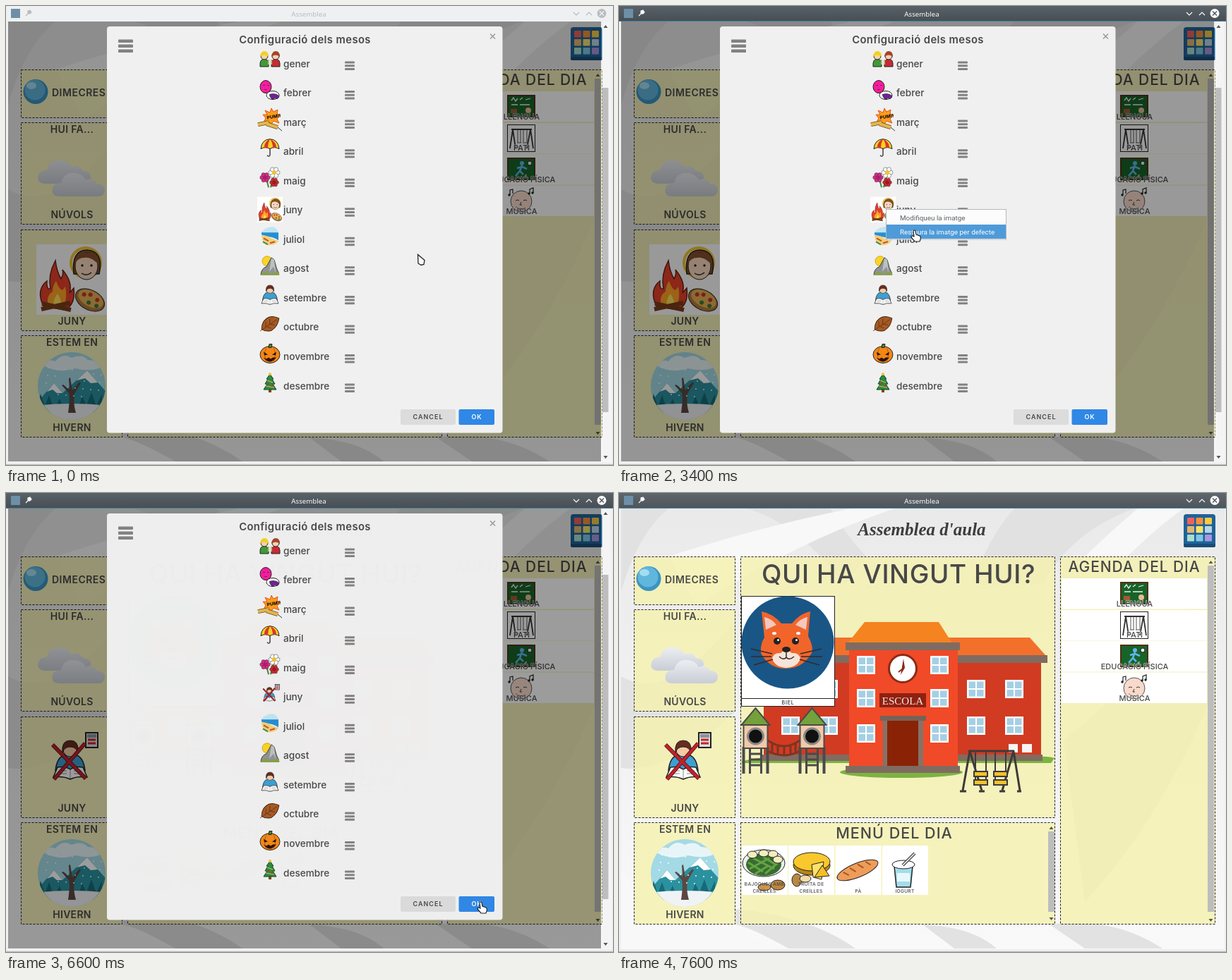
Animation, 860 px wide and 651 px high, one loop 7700 ms. Source, as an HTML page:

```html
<!DOCTYPE html>
<html lang="ca">
<head>
<meta charset="utf-8">
<title>Assemblea</title>
<style>
html, body { margin: 0; width: 100%; height: 100%; overflow: hidden; background: #f0f0f0; }
svg { display: block; font: 600 14px Inter, sans-serif; }
.ui { font: 9.9px Roboto, sans-serif; }
</style>
</head>
<body>
<svg id="stage" width="860" height="651" viewBox="0 0 860 651"></svg>
<script>
const $ = id => document.getElementById(id);
const R = (x, y, w, h, fill, more = '') => `<rect x="${x}" y="${y}" width="${w}" height="${h}" fill="${fill}" ${more}/>`;
const E = (x, y, rx, ry, fill, more = '') => `<ellipse cx="${x}" cy="${y}" rx="${rx}" ry="${ry}" fill="${fill}" ${more}/>`;
const C = (x, y, r, fill, more) => E(x, y, r, r, fill, more);
const P = (d, fill, stroke = 'none', w = 1) => `<path d="${d}" fill="${fill}" stroke="${stroke}" stroke-width="${w}"/>`;
const L = (d, stroke, w = 1) => P(d, 'none', stroke, w);
const T = (x, y, size, text, more = '') => `<text x="${x}" y="${y}" font-size="${size}" fill="#484848" ${more}>${text}</text>`;
const M = (x, y, size, text, more = '') => T(x, y, size, text, `text-anchor="middle" ${more}`);
const G = (x, y, body, s = 1) => `<g transform="translate(${x} ${y}) scale(${s})">${body}</g>`;
const each = (list, f) => list.map(f).join('');
const INK = 'stroke="#222"';

// ---- pictograms, drawn around their own centre ----
const student =
  P('M-23 6Q-21 -14 -9 -17H5Q17 -14 19 6L10 10H-14Z', '#3c9fd2', '#222', 1.5) +
  C(-2, -24, 10, '#f5c9a5', INK) + P('M-13 -19Q-15 -37 -2 -37Q11 -37 9 -19Q7 -28 -2 -28Q-11 -28 -13 -19', '#6a2a20', '#222') +
  P('M-26 15L-20 1Q-9 -1 -2 4Q5 -1 16 1L22 15Q8 13 -2 18Q-12 13 -26 15Z', '#fff', '#222', 1.5) +
  L('M-2 4V17M-18 6H-7M-20 10H-7M3 6H14M3 10H16', '#888');
const cross = 'M-27 -31L20 17M19 -33L-25 18';
const noSchool = student +
  R(20, -48, 17, 21, '#ddd', 'stroke="#222" stroke-width="2"') + R(22, -46, 13, 5, '#8a9499') + L('M23 -38H34M23 -33H34', '#c4262c', 3) +
  L(cross, '#3a1214', 5.5) + L(cross, '#c4202a', 4);
const bonfire = R(-50, -50, 100, 100, '#fff') +
  P('M-40 38Q-51 14 -35 2Q-36 15 -30 13Q-34 -7 -23 -27Q-21 -11 -15 -1Q-11 -8 -13 -14Q2 4 -3 19L3 12Q6 36 -10 43Z', '#e8402a', '#64241a', 1.5) +
  P('M-33 38Q-37 23 -27 17Q-27 9 -22 2Q-18 14 -13 15L-9 10Q-5 30 -14 40Z', '#ffa428') +
  P('M-25 39Q-27 28 -20 20Q-14 29 -14 39Z', '#ffe15a') +
  L('M-43 42L-2 33M-42 34L-1 43', '#7a3e1b', 6) +
  C(20, -24, 21, 'none', 'stroke="#f4c430" stroke-width="4"') +
  P('M3 -8Q-1 -42 22 -42Q46 -40 39 -8Z', '#85502c', '#222', 1.5) +
  E(21, -19, 16, 19, '#f8d8bd', INK) + P('M4 -22Q8 -42 22 -38Q37 -38 38 -21Q28 -33 18 -31Q9 -31 4 -22', '#85502c') +
  C(15, -20, 1.7, '#222') + C(28, -20, 1.7, '#222') + L('M14 -9Q21 -4 28 -10', '#222', 1.5) +
  G(26, 29, '<g transform="rotate(28)">' + E(0, 0, 22, 14, '#b57a37', INK) + E(0, -2, 19, 11, '#e4b255') +
    each([[-11, -3], [0, 4], [9, -5], [12, 3], [-3, -7]], (p, i) => C(...p, 3, i % 2 ? '#3d7a3b' : '#cc3528')) + '</g>');

const petals = (x, y, r, fill, mid) => each([0, 1, 2, 3, 4, 5], k =>
  C((x + r * Math.cos(k * 1.047)).toFixed(1), (y + r * Math.sin(k * 1.047)).toFixed(1), r * .6, fill, 'stroke="#333" stroke-width=".5"')) + C(x, y, r * .6, mid);
const person = (x, hair, coat) => P(`M${x - 6} 9Q${x - 7} -2 ${x} -2Q${x + 7} -2 ${x + 6} 9Z`, coat, '#222') +
  C(x, -6, 5, '#f7d0b0', INK) + P(`M${x - 6} -5Q${x - 5} -13 ${x} -13Q${x + 6} -13 ${x + 6} -5Q${x} -10 ${x - 6} -5`, hair);

const months = {
  gener: person(-8, '#f2d21e', '#3f9b36') + person(8, '#a4442c', '#c72a32') + L('M-2 -1V6M2 -1V6', '#bb8', 2),
  febrer: E(-6, -4, 8, 9, '#f41d9c', INK) + L('M-10 -6H-7M-4 -6H-1M-8 0H-4', '#8c1560') +
    E(4, 8, 9, 6, '#fff', INK) + P('M-1 7Q7 4 13 9Q12 15 7 12Q2 17 -1 7', '#6f2292', '#222', .6),
  'març': P('M2 -15L5 -10L11 -13L10 -7L15 -5L10 0L13 6L5 3L1 9L-2 3L-9 5L-6 -1L-10 -6L-4 -6L-7 -12L0 -9Z', '#ff9d19', '#e54f1a') +
    '<text x="-4" y="0" font-size="6.5" font-weight="800" transform="rotate(-10)" fill="#111">PUM!!</text>' +
    L('M-17 8L-2 5M-5 7L11 12', '#6a4a20', 6) + L('M-17 8L-2 5M-5 7L11 12', '#e4b64d', 4.5) + L('M11 12L17 17', '#333'),
  abril: P('M-13 1Q-12 -12 0 -13Q12 -12 13 1Q6 -3 0 1Q-6 -3 -13 1', '#f5d326', '#222') +
    P('M-8 -1Q-8 -10 0 -13Q-3 -7 -3 -1L0 1ZM4 -1Q4 -8 0 -13Q9 -9 9 -1Z', '#dd3524') + L('M0 0V10Q-1 13 -4 10', '#333', 1.4),
  maig: L('M-5 2L-2 14M6 -4L1 14', '#3d8b36', 2) + petals(6, -7, 5, '#fff', '#f5c32b') + petals(-7, 0, 4.5, '#d52b86', '#b41a6b') + petals(6, 7, 4, '#d5252a', '#a01820'),
  juny: `<g id="rowOld">${G(0, 4, bonfire, .36)}</g><g id="rowNew">${G(0, 4, noSchool, .36)}</g>`,
  juliol: P('M-12 -6Q-5 -14 5 -13Q13 -9 12 0H-12Z', '#bfe5f4') + P('M-12 -5H12V6Q4 1 -3 1L-12 -2Z', '#268fd0') +
    P('M-12 -1Q-2 -1 1 3L12 7Q8 13 -2 13Q-11 11 -12 -1', '#eed178') + L('M-9 3L-2 7M0 10L7 8', '#cf4d2d', 2) + L('M-10 8L-3 12', '#389047', 2),
  agost: C(-4, -6, 7, '#f8d527', 'stroke="#d9a41a"') + P('M-13 13Q-12 4 -5 2L2 -11L6 -8L9 3L13 13Z', '#8e9493', '#444') +
    P('M2 -10L-1 9L5 2L8 11L6 -8Z', '#bcc1bf') + P('M-14 14Q-6 6 0 12L13 9V14Z', '#879f45'),
  setembre: G(1, 5, student, .5),
  octubre: '<g transform="rotate(-32)">' + P('M-14 0Q-7 -11 4 -9Q11 -7 15 0Q8 9 -3 9Q-11 7 -14 0', '#a65a25', '#42210b') + L('M-17 1L12 0M-7 0L-3 -6M-1 0L4 -6M-6 0L-2 6M0 0L5 5', '#65310f', .8) + '</g>',
  novembre: E(0, 2, 14, 12, '#f28718', INK) + L('M-5 -8Q-10 2 -5 13M5 -8Q10 2 5 13', '#c35b0b') + P('M-2 -8L-1 -13H3L2 -8Z', '#4f8133', '#222') +
    P('M-9 -2L-3 2L-8 3ZM9 -2L3 2L8 3ZM-9 6L-5 8L-2 6L1 8L4 6L9 6Q4 12 0 12Q-5 12 -9 6', '#2b1408'),
  desembre: R(-2, 9, 4, 5, '#7a4823') + P('M0 -12L5 -5H3L7 2H4L9 10H-9L-4 2H-7L-3 -5H-5Z', '#2c8a45', '#154823') +
    L('M-4 -3L4 0M-6 5L6 7', '#e2c53b') + C(0, -12, 2, '#f4c52a') + C(-2, 2, 1.3, '#d8262c') + C(3, 5, 1.3, '#d8262c')
};
const rowY = i => 82 + 41.55 * i;
const bars = (x, y, w, h, step) => each([0, 1, 2], k => R(x, y + k * step, w, h, '#828282', 'rx="1"'));

// ---- page ----
const card = (x, y, w, h) => R(x, y, w, h, '#f6f2ae', 'fill-opacity=".8" stroke="#222" stroke-dasharray="3 2"');
const scroll = (x, top, bottom, y0, y1, w) => R(x, y0, w, y1 - y0, '#bdbdbd') +
  P(`M${x + 1.5} ${top + 3}l3 -4l3 4zM${x + 1.5} ${bottom - 3}l3 4l3 -4z`, '#555');
const pane = (x, y) => R(x, y, 26, 26, '#fff') + each([0, 1, 2, 3], k => R(x + 2.5 + (k % 2) * 11.5, y + 2.5 + (k >> 1) * 11.5, 9.5, 9.5, '#a5cfe4'));
const tower = x => L(`M${x - 17} 360V398M${x + 17} 360V398`, '#4a4a4a', 4) + L(`M${x - 8} 362V398M${x + 8} 362V398M${x - 8} 370h16m-16 8h16m-16 8h16`, '#4a4a4a', 3) +
  R(x - 17, 328, 34, 34, '#f1c9a8', 'stroke="#4a4a4a" stroke-width="2"') + C(x, 345, 11, '#111', 'stroke="#888" stroke-width="3"') +
  P(`M${x - 20} 329L${x} 305L${x + 20} 329Z`, '#74a13b', '#4a4a4a', 2);

const school =
  P('M174 381Q200 370 330 374H560Q605 372 617 376L612 383H174Z', '#7cb342') + E(400, 396, 87, 8, '#7cb342') +
  P('M222 205H582L606 232H198Z', '#f3702b') + R(205, 240, 393, 133, '#d13b22') + R(198, 230, 409, 11, '#806b60') + R(203, 371, 397, 9, '#806b60') +
  P('M324 213L348 183H453L472 213Z', '#f58320') + R(326, 220, 154, 170, '#f04a28') + R(321, 212, 162, 11, '#806b60') + R(321, 387, 162, 10, '#806b60') +
  each([231, 278, 328], y => pane(337, y) + pane(441, y)) +
  each([265, 317], y => each([230, 284, 493, 547], x => pane(x, y))) +
  R(374, 322, 57, 65, '#857267') + R(370, 316, 65, 7, '#766257') + R(380, 323, 44, 64, '#8a2306') +
  R(369, 284, 66, 20, '#8e2112') + '<text x="402" y="299.5" text-anchor="middle" style="font:15px Liberation Serif,serif" fill="#f6e9df">ESCOLA</text>' +
  C(402, 249, 19.5, '#fff', 'stroke="#8c2a16" stroke-width="3"') + P('M399 258L403 235L405 248Z', '#8c2a16') + L('M401 250L396 254', '#8c2a16', 2) +
  R(552, 356, 13, 12, '#f5f5f5') + R(571, 356, 14, 12, '#f5f5f5') +
  L('M211 351Q234 367 256 351M211 366Q234 378 256 366', '#7d3423', 3) + L('M217 355V367M225 359V371M234 360V372M243 359V371M250 355V367', '#7d3423', 3) +
  tower(193.5) + tower(273.5) +
  L('M495 366H560M497 366L487 422M497 366L514 422M559 366L543 422M559 366L568 422', '#3d3a3a', 3) +
  L('M483 423H492M510 423H518M539 423H547M564 423H570', '#3d3a3a', 3) +
  each([503, 531], x => L(`M${x + 2} 368V414M${x + 17} 368V414`, '#3d3a3a', 2) +
    each([395, 407], y => R(x, y, 19, 7, '#f2c22b', 'stroke="#3d3a3a" stroke-width="2"')));

const fox = R(173.5, 146.5, 132, 156, '#fff', 'stroke="#222"') + L('M173 291.5H306', '#222') + C(239, 212, 65.5, '#195686') +
  P('M206 205L202 168Q218 171 230 185H245Q256 171 271 168L268 203Q276 218 273 227Q260 249 237 249Q212 249 201 227Q200 214 206 205', '#f1652b') +
  P('M208 194L206 176Q216 178 223 187ZM265 194L267 176Q257 178 250 187Z', '#f7c7bd') +
  P('M217 235Q219 226 229 227L237 221L245 227Q255 226 257 235Q253 247 237 248Q221 247 217 235', '#f7e4d8') +
  each([[224, 210, 220], [250, 210, 254]], ([x, y, b]) => C(x, y, 5, '#222') + C(x + 1.5, y - 1.5, 1.5, '#fff') + E(b, 199, 3, 2, '#fff')) +
  E(237, 222, 6, 4, '#222') +
  L('M237 225V233M227 232Q233 238 237 233Q241 238 248 232M217 228L187 221M216 232L187 232M218 236L191 244M257 228L287 221M258 232L288 232M256 236L284 244', '#332b2b', 1.5) +
  M(239.5, 299.5, 7, 'BIEL', 'letter-spacing=".8"');

const cloud = (x, y) => G(x, y, P('M10 37Q-2 36 1 25Q4 17 13 18Q17 2 33 4Q44 5 48 14Q58 9 64 19Q76 20 75 29Q73 38 64 37Z', 'url(#mist)'));
const winter = '<clipPath id="disc"><circle cx="93" cy="539" r="48"/></clipPath><g clip-path="url(#disc)">' +
  R(44, 490, 98, 98, '#a3dae5') + P('M53 510Q59 500 70 504Q80 491 93 499Q108 493 116 502Q132 502 133 513Q120 519 98 514Q75 522 53 510', '#e8f5f8') +
  P('M40 567L68 535L80 549L115 517L146 552V572H40Z', '#2b919f') + P('M68 535L58 547L66 544L72 549L80 549ZM115 517L100 531L112 528L120 535L130 534Z', '#fff') +
  P('M44 572l5 -22l6 18l6 -16l7 20l8 -15l6 15l20 -1l6 -17l6 12l7 -18l7 19l8 -17v27h-100z', '#176a76') +
  P('M40 567Q93 561 146 567V590H40Z', '#f0f3f6') +
  P('M88 577Q91 556 89 549L79 538L81 537L90 544L89 528L91 527L94 545L104 533L106 535L97 550Q95 564 99 577Z', '#5b4743') +
  each([...Array(22).keys()], i => C(50 + i * 37 % 87, 512 + i * 29 % 48, .9, '#fff')) + '</g>';

const plate = E(205, 525, 30, 19, '#eee', INK) + E(205, 527, 25, 16, '#376d2d') +
  L('M183 524L204 537M190 518L220 533M204 516L222 527M185 533L213 518M207 540L228 522M193 540L211 529', '#66a247', 3) +
  each([[189, 513], [218, 512], [205, 511], [225, 520]], p => E(...p, 7, 5, '#f2edbd', INK)) + E(225, 556, 10, 7, '#bd873c', INK) + E(206, 559, 9, 5, '#cc974c', INK);
const omelette = E(273, 528, 26, 14, '#b98516', INK) + E(273, 523, 26, 13, '#f9c82e', INK) + P('M273 527L290 523L287 548L275 545Z', '#ffe06b', '#222') +
  P('M288 528L298 543L277 545Z', '#f5bf27', '#222') + E(252, 549, 7, 9, '#b88944', INK) + E(264, 547, 8, 5, '#f5dba7', INK);
const bread = '<g transform="rotate(-22 338 535)">' + E(338, 535, 31, 10, '#ee9c59', INK) + L('M318 530l6 7m5 -9l6 8m6 -9l6 8m6 -7l5 7', '#a95620', 2) + '</g>';
const yogurt = P('M390 529H416L413 559H393Z', '#a4dcea', '#222', 1.5) + E(403, 527, 16, 6, '#fff', INK) + L('M402 528L419 511', '#333', 4) + L('M402 528L419 511', '#ddd', 2) + R(394, 539, 18, 12, '#e7f8fb');

const board = y => R(711, y, 38, 30, '#186329', 'stroke="#4d3214" stroke-width="2"');
const agendaIcons = board(127) + L('M716 134l3 -4l3 5l3 -4m3 2l4 -3m4 3l7 -2M716 140h9m3 0h14', '#e8f3e6', 1.3) + R(715, 146, 9, 6, '#a35a32') + C(740, 148, 4, '#e8bb94') +
  R(710.5, 168.5, 39, 38, '#fff', 'stroke="#222"') + L('M716 175H745M718 175L714 202M718 175L722 202M743 175L738 202M743 175L747 202', '#333', 1.8) + L('M725 176V194M729 176V194M733 176V194M738 176V194M724 194h6m2 0h7', '#555') +
  board(216) + C(731, 223, 3, '#5db7eb') + L('M731 226L728 234L733 239M728 234L722 241M731 228L738 231M731 228L724 230', '#5db7eb', 2.5) + C(742, 223, 3, '#eee', INK) +
  E(730, 277, 15, 15, '#f8d9cb', 'stroke="#555"') + L('M722 276q3 -2 5 0m6 0q3 -2 5 0M730 278l-2 4h3M724 286q6 4 12 0', '#333') +
  L('M714 268V261l4 -1v6M742 266V260l5 -2v7', '#222', 1.2) + C(713, 268, 1.7, '#222') + C(741, 266, 1.7, '#222') + C(746, 265, 1.7, '#222');

const tiles = ['#f0625b', '#f7903b', '#f7cb45', '#e5b56f', '#f7e36d', '#b9d6e8', '#a9ddd1', '#7fc7e4', '#a996df'];
const page =
  R(3, 22, 855, 625, 'url(#paper)') +
  P('M3 22H70Q25 60 3 140ZM180 22Q250 40 320 130L350 90Q310 45 300 22ZM560 22Q525 60 500 130H600Q640 55 730 22Z', '#e1e1e1') +
  P('M3 260Q70 300 165 180V310Q70 400 3 390ZM630 350Q760 250 843 100V280Q770 460 660 580ZM165 590Q270 600 335 646H240Q185 615 165 612ZM430 612Q500 615 535 646H475ZM610 612Q700 600 770 646H660Z', '#e2e2e2') +
  P('M70 90Q210 45 330 22H390Q250 70 110 160ZM735 22Q690 60 650 100H710Q760 50 800 22ZM3 540Q100 610 240 646H3Z', '#f8f8f8') +
  card(21.5, 90.5, 143, 68) + card(21.5, 165.5, 143, 144) + card(21.5, 317.5, 143, 143) + card(21.5, 467.5, 143, 144) +
  card(172.5, 90.5, 445, 370) + card(172.5, 467.5, 445, 144) + card(625.5, 90.5, 219, 521) +
  '<text x="429" y="60" text-anchor="middle" style="font:italic bold 25px Liberation Serif,serif" fill="#3d3d3d">Assemblea d\'aula</text>' +
  R(800, 30, 45, 47, '#1f6399', 'rx="4"') + R(800, 72, 45, 5, '#174d79', 'rx="2"') +
  each(tiles, (c, i) => R(805 + i % 3 * 12.5, 35 + (i / 3 | 0) * 12, 10, 9.5, c, 'rx="1"')) +
  C(42, 121.5, 17.5, '#3b94c2') + C(41, 119, 14.5, '#61b6dc') + E(36, 113, 7, 5, '#a4dcf0') +
  T(65, 127.5, 14, 'DIMECRES', 'letter-spacing=".5"') +
  each([[180, 'HUI FA...'], [301, 'NÚVOLS'], [452, 'JUNY'], [482, 'ESTEM EN'], [603, 'HIVERN']], ([y, s]) => M(93.5, y, 14, s, 'letter-spacing=".3"')) +
  cloud(45, 215) + cloud(65, 233) + winter +
  `<g id="sideOld">${G(93, 388, bonfire)}</g><g id="sideNew">${G(93, 388, noSchool)}</g>` +
  school + M(396, 128, 37, 'QUI HA VINGUT HUI?', 'font-weight="500" letter-spacing=".6"') + fox +
  M(390, 490, 21.5, 'MENÚ DEL DIA', 'font-weight="500" letter-spacing="1"') + each([174, 240, 306.5, 373], x => R(x, 500, 65, 70, '#fff')) +
  plate + omelette + bread + yogurt +
  each([[206, 557, 'BAJOQUES AMB'], [206, 567, 'CREÏLLES'], [272, 557, 'TRUITA DE'], [272, 567, 'CREÏLLES'], [339, 567, 'PÀ'], [405, 567, 'IOGURT']], ([x, y, s]) => M(x, y, 6.6, s, 'font-weight="500" letter-spacing=".3"')) +
  scroll(608, 474, 605, 480, 594, 9) +
  M(730, 112, 21, 'AGENDA DEL DIA', 'font-weight="500" letter-spacing=".9"') + each([121, 166, 210, 254.5], y => R(627, y, 206, 43.5, '#fff')) + agendaIcons +
  each([[160.5, 'LLENGUA'], [205, 'PATI'], [249.5, 'EDUCACIÓ FÍSICA'], [294.5, 'MÚSICA']], ([y, s]) => M(730.5, y, 11, s, 'font-weight="500" stroke="#fff" stroke-width=".8" paint-order="stroke"')) +
  scroll(834, 97, 607, 103, 594, 9);

const bar = (fill, ink, x) => R(0, 0, 860, 22, fill) + R(7, 4, 13, 13, '#6d90a8') +
  P('M31 7l3 -1l2 3l-2 2l-3 0zM28 14l4 -4', ink, ink, 1.2) +
  `<text x="429" y="14.5" text-anchor="middle" style="font:9.7px Noto Sans,sans-serif" fill="${ink}">Assemblea</text>` +
  L('M804 9l4 4l4 -4M822 13l4 -4l4 4', ink, 1.2) + C(844, 10.5, 6.5, ink) + L('M841 7.5l6 6m0 -6l-6 6', x, 1.3);

const dialog = R(143, 29, 560.5, 576.5, '#f0f0f0', 'rx="4"') + bars(159, 47.5, 21, 4.5, 7) +
  M(423.5, 53, 14.8, 'Configuració dels mesos', 'letter-spacing=".4"') + L('M686 39.5l7 7m0 -7l-7 7', '#999', 1.5) +
  R(333, 0, 180, 37.7, '#42a5f5', 'id="hover"') +
  each(Object.entries(months), ([name, icon], i) => G(374, rowY(i) - 5, icon) + T(393, rowY(i) + 4.5, 13.6, name, 'font-weight="500"') + bars(480, rowY(i) - 3.5, 14, 3, 4.7)) +
  R(559, 572, 78, 22, '#dcdcdc', 'rx="2"') + R(641.5, 572, 50.5, 22, '#2f87e6', 'rx="2"') +
  M(598, 586, 9, 'CANCEL', 'letter-spacing="1"') + M(667, 586, 9, 'OK', 'letter-spacing="1" style="fill:#fff"');

const menu = R(378.5, 288.5, 170, 42.5, '#fcfcfc', 'stroke="#b5b9bc"') + R(379, 290, 169, 20, '#4f9bd9', 'id="pick"') +
  each(['Modifiqueu la imatge', 'Restaura la imatge per defecte'], (s, i) => `<text class="ui" id="item${i}" x="398" y="${303.5 + 20 * i}">${s}</text>`);

const arrow = P('M.5 .5L1 13L5 15.5L9 14.5L10 8.5Z', '#f8f8f8', '#222', 1.3);
const hand = P('M-1 1Q.5 -1 2 1L3 6L8 8Q10 9 9 13L8 16H1L-4 10Q-4 8 -2 8L0 9Z', '#fff', '#222', 1.2);
const shades = (id, a, b) => `<linearGradient id="${id}" x2="0" y2="1"><stop stop-color="${a}"/><stop offset="1" stop-color="${b}"/></linearGradient>`;

$('stage').innerHTML =
  `<defs>${shades('paper', '#eaeaea', '#f9f9f9') + shades('steel', '#596268', '#464e54') + shades('mist', '#eceef2', '#c8cdd5')}</defs>` +
  page + R(3, 22, 840, 624, '#000', 'id="shade"') +
  `<g id="scrollbar">${R(844.5, 22, 13, 624, '#f4f4f4') + scroll(845, 28, 641, 116, 576, 8.5)}</g>` +
  R(0, 647, 860, 3, '#eceef0') + R(0, 650, 860, 1, '#b9b2b0') +
  bar('#eff0f1', '#b9bdc1', '#eff0f1') + `<g id="active">${bar('url(#steel)', '#fcfcfc', '#475057') + R(0, 21, 860, 1, '#3f7f9f')}</g>` +
  `<g id="dialog">${dialog}</g><g id="menu">${menu}</g>` +
  `<g id="pointer"><g id="arrow">${arrow}</g><g id="hand">${hand}</g><g id="plus">${L('M16 9V21M10 15H22', '#234d12', 5)}${L('M16 10V20M11 15H21', '#7fd03a', 2.5)}</g></g>`;

// ---- motion: pointer stops as [time, x, y, shape] ----
const stops = [[0, 583, 352, 'arrow']];
for (let k = 1; k <= 8; k++) stops.push([200 + 100 * k, 583 - 26.9 * k, 352 - 7.25 * k, 'arrow']);
stops.push([1100, 371, 292, 'copy'], [1200, 375, 289, 'copy'], [1300, 378, 286, 'copy'],
  [2300, 395, 293, 'hand'], [2400, 412, 296, 'hand'], [3400, 418, 318, 'hand'], [3700, 427, 319, 'hand'], [3800, 433, 320, 'hand'],
  [4600, 437, 310, 'arrow'], [4800, 441, 299, 'arrow'], [5100, 560, 318, 'arrow'], [5200, 660, 375, 'arrow'],
  [5300, 732, 436, 'arrow'], [5400, 730, 478, 'arrow'], [5500, 709, 511, 'arrow'], [5700, 683, 558, 'arrow'],
  [6100, 676, 572, 'hand'], [6200, 672, 580, 'hand'], [6800, 802, 340, 'arrow'], [7100, 806, 150, 'arrow'], [7200, 815, 26, 'arrow'], [7400, 820, -40, 'arrow']);

const step = (t, ...pairs) => pairs.reduce((v, [at, next]) => t >= at ? next : v, 0);
const fade = (id, v) => $(id).setAttribute('opacity', +v);

function draw(t) {
  const [, x, y, shape] = stops.filter(s => s[0] <= t).pop();
  $('pointer').setAttribute('transform', `translate(${x} ${y})`);
  fade('arrow', shape != 'hand');
  fade('hand', shape == 'hand');
  fade('plus', shape == 'copy');

  const row = Math.floor((y - 63.2) / 41.55), top = rowY(row) - 18.8;
  const menuOpen = t >= 1700 && t < 3700;
  fade('hover', !menuOpen && x > 333 && x < 513 && row >= 0 && row < 12 && y < top + 37.7);
  $('hover').setAttribute('y', top);

  const second = t >= 3400, picked = t >= 2300;
  fade('menu', step(t, [1700, .4], [1800, .8], [1900, 1], [3700, .3], [3800, 0]));
  fade('pick', picked);
  $('pick').setAttribute('y', second ? 310 : 290);
  [0, 1].forEach(i => $('item' + i).setAttribute('fill', picked && second == i ? '#fff' : '#5c6265'));

  const swap = step(t, [3700, .15], [3800, .3], [4000, .55], [4200, .85], [4300, 1]);
  fade('sideOld', 1 - swap);
  fade('sideNew', swap);
  fade('rowOld', t < 3700);
  fade('rowNew', t >= 3700);

  fade('active', step(t, [1700, .35], [1800, .7], [1900, 1], [7400, .99], [7500, .98], [7600, .96]));
  fade('shade', step(t, [0, .4], [6600, .39], [6800, .17], [7100, .04], [7200, 0]));
  fade('dialog', step(t, [0, 1], [6600, .985], [6800, .38], [7100, 0]));
  fade('scrollbar', t < 7100);
  $('dialog').setAttribute('transform', `translate(423 0) scale(${t >= 6800 ? .618 : 1} 1) translate(-423 0)`);
}

const start = performance.now();
function loop() {
  draw(Math.floor((performance.now() - start) % 7700 / 100) * 100);
  requestAnimationFrame(loop);
}
loop();
</script>
</body>
</html>
```
